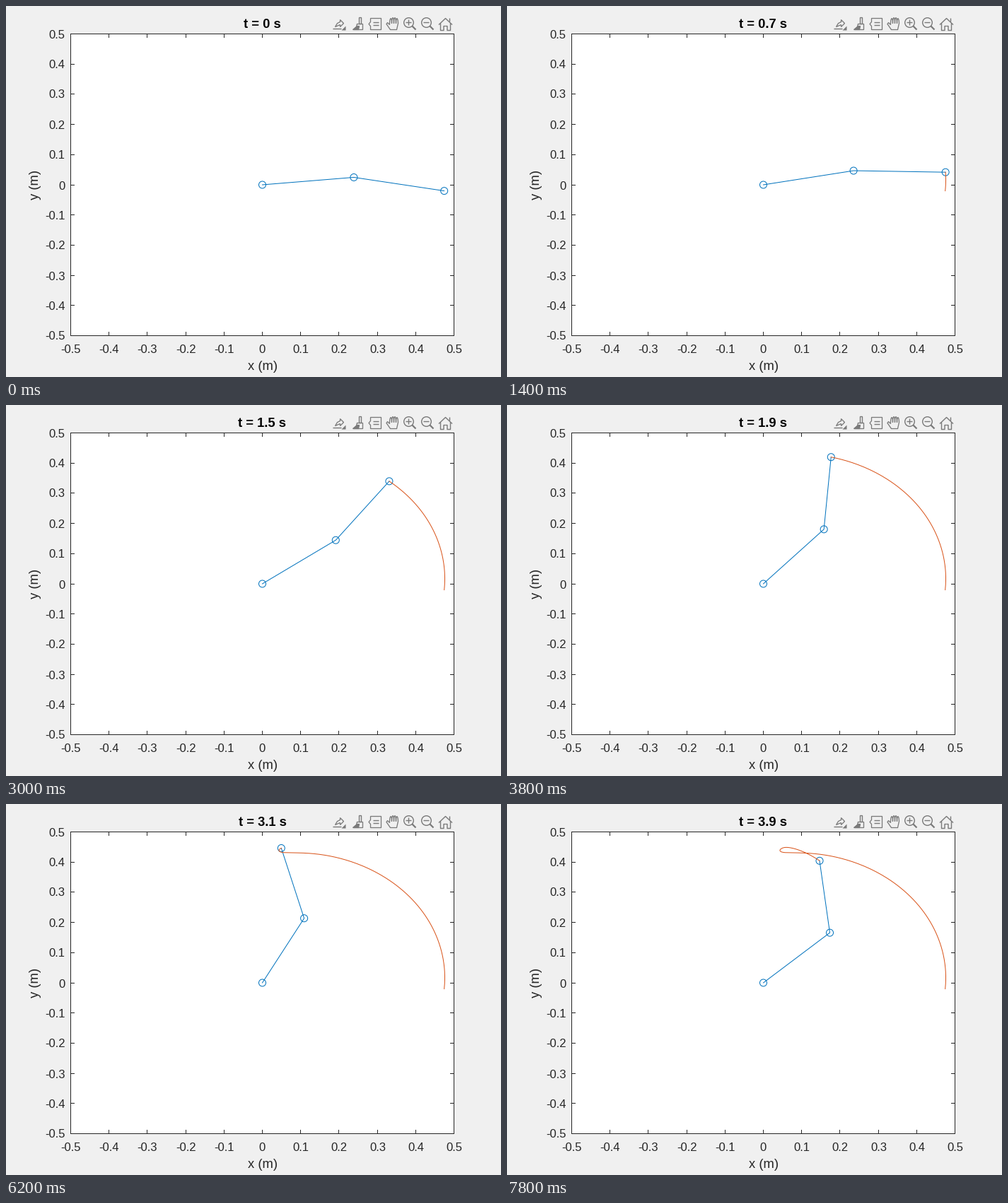
A matplotlib script for the animation above (8 s loop, 700 px wide and 525 px high).

```python
import numpy as np
import matplotlib.pyplot as plt
from matplotlib.animation import FuncAnimation
from matplotlib.patches import Circle, Polygon, Rectangle

W, H, DPI = 700, 525, 100
FRAMES, STEP_MS, DT = 40, 200, 0.1
LEFT, RIGHT, TOP, BOTTOM = 91.5, 633.5, 39.5, 466.5
CX, CY = (LEFT + RIGHT) / 2, (TOP + BOTTOM) / 2
LINK, TICK = 0.24, 5.5
BLUE, ORANGE, INK, GREY = "#0072bd", "#d95319", "#262626", "#7a7a7a"
PT = 72 / DPI  # points per pixel

# key poses of the arm: time (s), angle of each link from the x axis (rad)
POSES = np.array([(0, .103, -.188), (.7, .196, -.021), (1.1, .401, .376),
                  (1.9, .852, 1.493), (2.5, 1.008, 1.879), (3.1, 1.099, 1.822),
                  (3.6, 1.007, 1.722), (3.9, .763, 1.6825)])

plt.rcParams["font.family"] = "Liberation Sans"
plt.rcParams["path.snap"] = False


def spline(t, v):
    """Cubic spline that starts at rest and has a free end."""
    h = np.diff(t)
    d = np.diff(v) / h
    n = len(t)
    a, b = np.eye(n), np.zeros(n)
    for i in range(1, n - 1):
        p, q = 1 / h[i - 1], 1 / h[i]
        a[i, i - 1:i + 2] = p, 2 * (p + q), q
        b[i] = 3 * (d[i - 1] * p + d[i] * q)
    a[-1, -2:] = 1, 2
    b[-1] = 3 * d[-1]
    m = np.linalg.solve(a, b)

    def at(x):
        i = np.clip(np.searchsorted(t, x, side="right") - 1, 0, n - 2)
        s = (x - t[i]) / h[i]
        return (v[i] * (1 + 2 * s) * (1 - s) ** 2
                + v[i + 1] * s * s * (3 - 2 * s)
                + h[i] * s * (1 - s) * (m[i] * (1 - s) - m[i + 1] * s))

    return at


upper, fore = (spline(POSES[:, 0], POSES[:, c]) for c in (1, 2))


def to_px(x, y):
    return CX + x * (RIGHT - LEFT), CY - y * (BOTTOM - TOP)


def joints(t):
    a, b = upper(t), fore(t)
    ex, ey = LINK * np.cos(a), LINK * np.sin(a)
    return (ex, ey), (ex + LINK * np.cos(b), ey + LINK * np.sin(b))


fig = plt.figure(figsize=(W / DPI, H / DPI), dpi=DPI, facecolor="#f0f0f0")
ax = fig.add_axes([0, 0, 1, 1])
ax.set_xlim(0, W)
ax.set_ylim(H, 0)
ax.axis("off")


def stroke(pts, width=1.4, color=GREY):
    x, y = zip(*pts)
    ax.plot(x, y, color=color, lw=width * PT, solid_capstyle="butt")


def box(x, y, w, h, width=1.4, color=GREY, face="none"):
    ax.add_patch(Rectangle((x, y), w, h, fc=face, ec=color, lw=width * PT))


def ring(x, y, r, width=1.4, color=GREY):
    return ax.add_patch(Circle((x, y), r, fc="none", ec=color, lw=width * PT))


def outline(pts, face="none"):
    ax.add_patch(Polygon(pts, fc=face, ec=GREY, lw=1.3 * PT))


def label(x, y, s, px, ha="center", **kw):
    kw.setdefault("color", INK)
    return ax.text(x, y, s, fontsize=px * PT, ha=ha, va="baseline", **kw)


def draw_axes():
    box(LEFT, TOP, RIGHT - LEFT, BOTTOM - TOP, 1, INK, "white")
    for i in range(-5, 6):
        x, y = np.floor(to_px(i / 10, i / 10)) + .5
        text = f"{i / 10:g}"
        for top, left in ((TOP, LEFT), (BOTTOM - TICK, RIGHT - TICK)):
            stroke([(x, top), (x, top + TICK)], 1, INK)
            stroke([(left, y), (left + TICK, y)], 1, INK)
        label(x, 491, text, 16.67)
        label(83.5, y + 6, text, 16.67, ha="right")
    label(CX + .5, 515, "x (m)", 18.33)
    label(45.5, CY, "y (m)", 18.33, rotation=90, rotation_mode="anchor")


def export_icon(x, y):
    outline([(x - 6, y + 4), (x - 3, y - 1), (x + 1, y - 3), (x + 1, y - 6),
             (x + 6, y - 1), (x + 1, y + 4), (x + 1, y + 1)])
    stroke([(x - 9, y + 7), (x + 3, y + 7)])
    ax.add_patch(Polygon([(x + 9, y + 3), (x + 9, y + 9), (x + 3, y + 9)],
                         fc=GREY))


def brush_icon(x, y):
    box(x + 1, y - 9, 3, 9)
    outline([(x - 2, y), (x + 6, y), (x + 6, y + 8), (x - 8, y + 8),
             (x - 3, y + 4)])
    outline([(x - 2, y + 3), (x + 1, y + 3), (x, y + 8), (x - 7, y + 8)], GREY)


def tip_icon(x, y):
    outline([(x - 7, y - 8), (x + 8, y - 8), (x + 8, y + 8), (x - 7, y + 8),
             (x - 7, y + 3), (x - 9.5, y), (x - 7, y - 3)])
    for dy in (-2, 2):
        stroke([(x - 3, y + dy), (x + 5, y + dy)])


def hand_icon(x, y):
    # four arches for the fingers, closed by the palm and thumb
    u = np.linspace(0, 1, 49)
    lift = (6 + 2 * np.sin(np.pi * u)) * np.abs(np.sin(4 * np.pi * u)) ** .4
    fingers = list(zip(x - 4 + 12 * u, y - 1 - lift))
    outline(fingers + [(x + 6, y + 8), (x - 3, y + 8), (x - 8.5, y),
                       (x - 7, y - 2), (x - 4, y + 1)])


def zoom_icon(x, y, plus):
    ring(x, y, 6.8)
    stroke([(x + 5, y + 5), (x + 10, y + 10)], 2.2)
    stroke([(x - 4, y), (x + 4, y)])
    if plus:
        stroke([(x, y - 4), (x, y + 4)])


def home_icon(x, y):
    stroke([(x - 9.5, y + 1), (x, y - 8), (x + 9.5, y + 1)])
    stroke([(x + 6, y - 8), (x + 6, y - 3)])
    for side in (-1, 1):
        stroke([(x + 7 * side, y - 1), (x + 7 * side, y + 9),
                (x + 2.5 * side, y + 9), (x + 2.5 * side, y + 3), (x, y + 3)])


def draw_toolbar():
    y = 25.5
    export_icon(471.5, y)
    brush_icon(498.5, y)
    tip_icon(522.5, y)
    hand_icon(546.5, y)
    zoom_icon(569.5, y - 2, True)
    zoom_icon(594.5, y - 2, False)
    home_icon(621.5, y)


draw_axes()
draw_toolbar()
title = label(CX, 31, "", 18.33, weight="bold", color="black")
arm, = ax.plot([], [], color=BLUE, lw=PT)
rings = [ring(0, 0, 5, 1, BLUE) for _ in range(3)]
trace, = ax.plot([], [], color=ORANGE, lw=PT)


def update(k):
    t = k * DT
    pts = [to_px(*p) for p in ((0, 0), *joints(t))]
    arm.set_data(*zip(*pts))
    for r, p in zip(rings, pts):
        r.center = p
    trace.set_data(*to_px(*joints(np.linspace(0, t, 8 * k + 1))[1]))
    title.set_text(f"t = {t:g} s")
    return arm, *rings, trace, title


anim = FuncAnimation(fig, update, frames=FRAMES, interval=STEP_MS,
                     init_func=lambda: update(0), repeat=True, repeat_delay=0)
plt.show()
```
